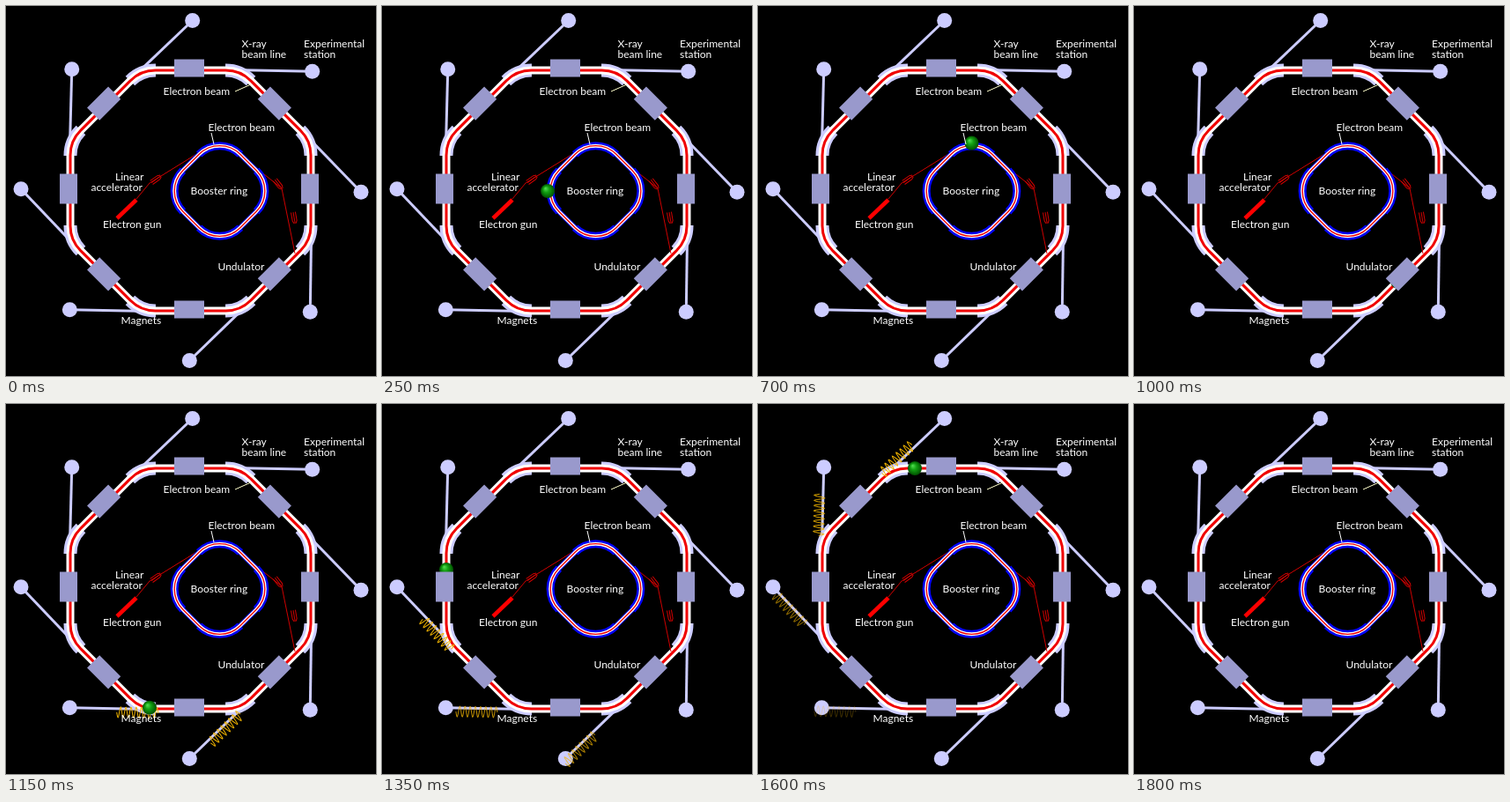
An HTML page with a canvas that plays this animation: 420x420 px, repeating every 3.85 s.

```html
<!DOCTYPE html>
<html lang="en">
<head>
<meta charset="utf-8">
<title>Electron storage ring</title>
<style>
html, body { margin: 0; width: 100%; height: 100%; overflow: hidden; background: #000; }
canvas { display: block; }
</style>
</head>
<body>
<canvas id="stage" width="420" height="420"></canvas>
<script>
const ctx = document.getElementById('stage').getContext('2d');
const LOOP = 3850, STEP = 50, END = 1800;
const LILAC = '#ccccff', BOX = '#9999cc', RED = '#f00000', DARK_RED = '#d00000';
const MID = [209.5, 209.5], UNDULATOR_MID = [208, 207.5], BOOSTER_MID = [242.5, 210];
const APOTHEM = 136.5;

const rad = deg => deg * Math.PI / 180;
const polar = ([x, y], r, deg) => [x + r * Math.cos(rad(deg)), y + r * Math.sin(rad(deg))];
const lerp = (a, b, f) => a + (b - a) * f;
const around = (n, make) => Array.from({ length: n }, (_, k) => make(k * 360 / n));

const ring = around(8, a => polar(MID, APOTHEM / Math.cos(rad(22.5)), a + 22.5));
const booster = around(4, a => polar(BOOSTER_MID, 65, a));
const beams = around(8, a => [polar(MID, 145, a - 26), polar([210, 209.5], 193, a + 0.5)]);

const linac = [[148, 219], [163, 201], [218, 167]];
const transfer = [[288, 187], [313, 207], [328, 281]];

// light pulses: beam line, birth time, distance from the magnet
const pulses = [[2, 1100, 23], [3, 1150, 13], [4, 1300, 6], [5, 1450, 2], [6, 1600, 20], [7, 1650, 44]];

// ball in the main ring: time, angle
const orbit = [[950, 29], [1350, 189], [1600, 257], [1800, 318]];

const labels = [
  ['X-ray', 267.5, 47], ['beam line', 267.5, 59], ['Experimental', 338, 47], ['station', 338, 59],
  ['Electron beam', 178.5, 101], ['Electron beam', 229.5, 142], ['Linear', 124, 198],
  ['accelerator', 96.5, 209.5], ['Electron gun', 110, 252], ['Booster ring', 209.5, 214],
  ['Undulator', 240.5, 300], ['Magnets', 130.5, 361]
];

function line(pts, color, width) {
  ctx.beginPath();
  pts.forEach(p => ctx.lineTo(...p));
  ctx.strokeStyle = color;
  ctx.lineWidth = width;
  ctx.stroke();
}

function disc([x, y], r, fill) {
  ctx.beginPath();
  ctx.arc(x, y, r, 0, 7);
  ctx.fillStyle = fill;
  ctx.fill();
}

function placed([x, y], angle, paint) {
  ctx.save();
  ctx.translate(x, y);
  ctx.rotate(angle);
  paint();
  ctx.restore();
}

function toward(a, b, d) {
  const f = d / Math.hypot(b[0] - a[0], b[1] - a[1]);
  return [lerp(a[0], b[0], f), lerp(a[1], b[1], f)];
}

// rounded corners of a polygon, joined into a loop when asked
function corners(pts, r, reach, joined) {
  const path = new Path2D(), n = pts.length;
  pts.forEach((p, i) => {
    const before = toward(p, pts[(i + n - 1) % n], reach);
    const after = toward(p, pts[(i + 1) % n], reach);
    if (joined && i) path.lineTo(...before);
    else path.moveTo(...before);
    path.arcTo(...p, ...after, r);
    path.lineTo(...after);
  });
  if (joined) path.closePath();
  return path;
}

function strokes(path, ...pairs) {
  for (const [color, width] of pairs) {
    ctx.strokeStyle = color;
    ctx.lineWidth = width;
    ctx.stroke(path);
  }
}

const ringPath = corners(ring, 40, 20, true);
const magnetPath = corners(ring, 40, 17);
const boosterPath = corners(booster, 33, 34, true);
const bendPath = corners(booster, 33, 32);

function coils(p, angle) {
  placed(p, angle, () => {
    for (const off of [-2.5, 0, 2.5]) line([[-6, off], [4, off], [7, off * 0.4]], DARK_RED, 1);
  });
}

function drawInjector() {
  line(linac, DARK_RED, 1);
  line([[126, 241], [148, 220]], '#ff0000', 4.5);
  line(transfer, DARK_RED, 1);
  coils([170, 197], -0.62);
  coils([309, 202], 0.9);
  coils([327, 240], 1.4);
}

function drawPulse(t, [k, born, lead]) {
  const age = t - born;
  if (age < 0 || age >= STEP * 10 || t >= END) return;
  const [from, to] = beams[k];
  const angle = Math.atan2(to[1] - from[1], to[0] - from[0]);
  const travel = lead + 72 * (1 - Math.exp(-age / 230));
  placed(from, angle, () => {
    ctx.globalAlpha = 1 - (age / 540) ** 1.6;
    const wave = [];
    for (let s = -23.5; s <= 23.5; s += 0.5) {
      wave.push([travel + s, 6 * Math.sin(s / 47 * 16 * Math.PI) - 4]);
    }
    line(wave, '#f0b400', 1);
  });
}

function ringPoint(t) {
  const i = orbit.findIndex(([time]) => t < time);
  const [t0, a0] = orbit[i - 1], [t1, a1] = orbit[i];
  const a = lerp(a0, a1, (t - t0) / (t1 - t0));
  const off = (a + 22.5) % 45 - 22.5;
  return polar(MID, Math.min(APOTHEM / Math.cos(rad(off)), 143), a);
}

function transferPoint(f) {
  const i = f < 0.4 ? 0 : 1;
  const [a, b] = [transfer[i], transfer[i + 1]];
  const g = i ? (f - 0.4) / 0.6 : f / 0.4;
  return [lerp(a[0], b[0], g), lerp(a[1], b[1], g)];
}

function ballAt(t) {
  if (t < 50 || t >= END) return null;
  if (t < 100) return linac[1];
  if (t < 800) return polar(BOOSTER_MID, 54.5, (Math.min(t, 700) / STEP - 3) * 90);
  if (t < 950) return transferPoint((t - 800) / 150);
  return ringPoint(t);
}

function drawBall([x, y]) {
  const g = ctx.createRadialGradient(x - 2.5, y - 3, 0.5, x, y, 8);
  g.addColorStop(0, '#4cd84c');
  g.addColorStop(0.4, '#12a012');
  g.addColorStop(1, '#005000');
  disc([x, y], 8, g);
}

function drawUndulators() {
  ctx.fillStyle = BOX;
  for (let a = 0; a < 360; a += 45) {
    placed(polar(UNDULATOR_MID, 137, a), rad(a), () => ctx.fillRect(-10, -17, 20, 34));
  }
}

function drawLabels() {
  line([[260, 97], [278, 89]], '#ffffcc', 1);
  line([[233, 144], [236, 157]], '#fff', 1);
  ctx.font = '12px Lato, "Open Sans", sans-serif';
  ctx.fillStyle = '#fff';
  for (const label of labels) ctx.fillText(...label);
}

function draw(t) {
  ctx.fillStyle = '#000';
  ctx.fillRect(0, 0, 420, 420);
  for (const [magnet, station] of beams) {
    line([magnet, station], LILAC, 3);
    disc(station, 8.5, LILAC);
  }
  strokes(magnetPath, [LILAC, 15]);
  strokes(ringPath, ['#fff', 9], [RED, 3]);
  pulses.forEach(p => drawPulse(t, p));
  drawInjector();
  strokes(bendPath, ['#0000ff', 9]);
  strokes(boosterPath, ['#0000e0', 6], ['#fff', 4], [RED, 1.4]);
  const ball = ballAt(t);
  if (ball) drawBall(ball);
  drawUndulators();
  drawLabels();
}

const start = performance.now();
function tick() {
  const t = (performance.now() - start) % LOOP;
  draw(Math.floor(t / STEP) * STEP);
  requestAnimationFrame(tick);
}
tick();
</script>
</body>
</html>
```
